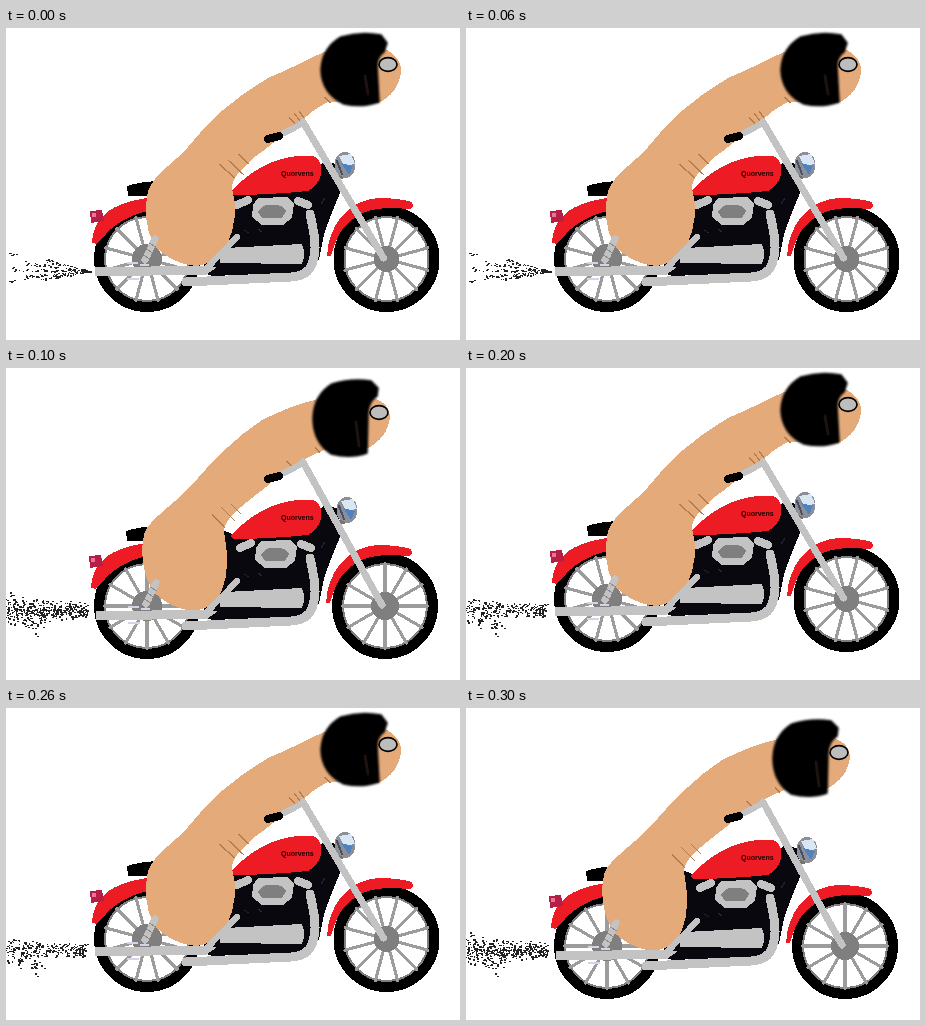
An HTML page for the animation above (0.4 s loop, 454 by 312 pixels).

```html
<!DOCTYPE html>
<html lang="en">
<head>
<meta charset="utf-8">
<title>Motorbike ride</title>
<style>
html, body { margin: 0; width: 100%; height: 100%; overflow: hidden; background: #fff; }
svg { display: block; width: 100%; height: 100%; }
text { font: bold 7px "Liberation Sans", sans-serif; }
</style>
</head>
<body>
<svg id="stage" viewBox="0 0 454 312" fill="none" shape-rendering="crispEdges"></svg>
<script>
const STEP = 100;
const SILVER = '#c3c3c3', GREY = '#7f7f7f', RED = '#ed1c24', SKIN = '#e5aa7a', BLACK = '#000';

const fill = (d, color) => `<path d="${d}" fill="${color}"/>`;
const line = (d, color, width, cap = 'round') =>
  `<path d="${d}" stroke="${color}" stroke-width="${width}" stroke-linecap="${cap}" stroke-linejoin="round"/>`;
const disc = (x, y, rx, ry, color, extra = '') =>
  `<ellipse cx="${x}" cy="${y}" rx="${rx}" ry="${ry}" fill="${color}" ${extra}/>`;
const shift = ([x, y], ...parts) => `<g transform="translate(${x} ${y})">${parts.join('')}</g>`;

function wheel([x, y], hub, turn) {
  let spokes = '';
  for (let i = 0; i < 12; i++) {
    const a = (i * 30 + turn) * Math.PI / 180;
    spokes += `M0 0L${(43 * Math.cos(a)).toFixed(1)} ${(43 * Math.sin(a)).toFixed(1)}`;
  }
  return shift([x, y],
    disc(0, 0, 48, 48, '#fff', `stroke="${BLACK}" stroke-width="10"`),
    disc(0, 0, 42, 42, 'none', `stroke="${GREY}" stroke-width="2"`),
    line(spokes, '#9c9c9c', 3.1),
    disc(0, 0, hub, hub, GREY));
}

const rearFender = () =>
  fill('M121 158Q132 154 152 153V168L122 168Z', BLACK) +
  fill('M86 215Q87 194 104 182Q122 171 152 169V181Q118 186 100 206L91 216Z', RED) +
  fill('M84 183L96 182L98 193L85 195Z', '#b51f45') + fill('M86 185h4v4h-4z', '#e8749a');

const frontFender = () =>
  fill('M321 228C322 198 342 172 372 170Q392 170 406 174Q409 181 402 181Q384 179 371 181C350 184 334 199 329 216L325 228Z', RED);

const engine = () =>
  fill('M213 156L230 164L300 160L317 134L331 136L336 160L325 187L318 206L313 232L300 244L207 248L194 244L216 207Z', '#08080e') +
  line('M238 202l5 3m9-4l4 3m45-16l5-4m9-8l4-6m-82 51l7 1m32 1l6-1', '#25253d', 1);

const engineTrim = () =>
  line('M231 177L242 172', SILVER, 8) + line('M292 173L302 177', SILVER, 8) +
  fill('M252 170L281 169L288 176L286 190L277 197H256L246 189L247 177Z', SILVER) +
  fill('M257 178Q266 175 275 178L280 183L276 190H256L252 184Z', GREY);

const lowerPipes = () =>
  fill('M219 220L296 216Q300 226 296 236L214 235Q213 228 219 220Z', SILVER) +
  line('M304 186C308 205 312 220 306 236Q302 248 285 249L180 254', SILVER, 9) +
  line('M231 209L201 240', SILVER, 6);

const tank = label =>
  fill('M224 164Q244 143 266 134Q288 126 307 128Q317 132 315 146Q313 157 302 163Q260 167 228 167Z', RED) +
  `<text x="275" y="148" fill="#200">${label}</text>`;

const lamp = () =>
  disc(339, 137, 10.5, 13, '#8c8e98') + fill('M333 128L345 126L349 136L338 138Z', '#d9e7f5') +
  fill('M335 135L347 138L343 147Z', '#4f83bd') + line('M331 133L336 146', '#4a5063', 2) +
  line('M328 147L336 150', '#77736b', 3);

const muffler = () =>
  line('M149 211L139 232', SILVER, 7) +
  line('M143 215l7 4m-10 2l7 4m-10 2l7 4', '#8c8c8c', 1) +
  fill('M89 239L200 238L211 239L200 247L89 248Z', SILVER) +
  line('M122 235h9m4 2h7m-20 14h10', '#dcd0e8', 2);

function rider(p) {
  return fill(p.body, SKIN) + line(p.folds, '#b47b4d', 1.3);
}

function head(p) {
  const [x, y] = p.goggles;
  return `<g shape-rendering="auto"><g filter="url(#soft)">${fill(p.helmet, BLACK)}${line(p.helmet, BLACK, 1.5)}</g>` +
    line(p.shine, '#1d1210', 3) +
    disc(x, y, 9, 6.8, '#bdbdbd', `stroke="${BLACK}" stroke-width="1.7"`) + '</g>';
}

function scene(p) {
  const [fx, fy] = p.front;
  return wheel(p.rear, 15, p.turn) + wheel(p.front, p.hub, p.turn) +
    shift(p.rearFender, rearFender()) + shift(p.frontFender, frontFender()) +
    shift(p.block, engine()) + shift(p.trim, engineTrim()) +
    shift(p.tank, tank('Quorvens')) + shift(p.lamp, lamp()) + rider(p) +
    shift(p.block, lowerPipes()) + shift(p.muffler, muffler()) +
    line(`M297 94L${fx - 3} ${fy - 1}`, SILVER, 7) +
    line('M297 95L288 100L278 105', SILVER, 6) + line('M262 111L273 108', BLACK, 8) + head(p);
}

const high = {
  rear: [141, 231], front: [380.5, 231], hub: 13, turn: 15,
  rearFender: [0, 0], frontFender: [0, 0], block: [0, 0], trim: [0, 0],
  tank: [0, 0], lamp: [0, 0], muffler: [0, 0],
  body: 'M142 163C150 144 166 137 182 119C203 92 228 70 262 50C284 41 300 32 318 24L378 20Q396 30 395 44Q392 66 372 75L322 74Q302 84 296 94C278 104 270 114 250 128C238 140 226 148 226 160C231 178 230 198 221 217Q210 236 190 238Q164 235 148 217C139 200 138 180 142 163Z',
  folds: 'M213 136L229 150M222 132L238 147M232 126L243 136M283 89L289 96M288 85L294 93M293 83L298 90M318 69L325 75',
  helmet: 'M315 42Q316 20 335 9Q355 3 375 7L381 15L378 24Q371 29 371 38L373 74Q356 80 338 76Q316 66 315 42Z',
  shine: 'M359 48L362 66', goggles: [382, 36.5]
};
const low = {
  rear: [141, 238], front: [379, 238], hub: 14, turn: 0,
  rearFender: [-1, 5], frontFender: [-1, 7], block: [0, 4], trim: [3, 3],
  tank: [0, 4], lamp: [2, 5], muffler: [1, 4],
  body: 'M138 166C143 152 162 141 184 119C207 92 230 69 256 52C276 42 292 36 312 31L368 30Q384 36 384 50Q381 70 362 80L318 82Q300 90 290 96C272 108 262 118 246 130C230 143 218 152 218 164C222 185 223 205 216 222Q207 242 185 243Q160 238 146 222C136 204 134 184 138 166Z',
  folds: 'M206 146L219 160M215 139L229 153M225 136L235 146M280 93L286 98M309 79L314 85',
  helmet: 'M307 50Q308 27 326 16Q345 10 365 13L372 20L371 28Q363 33 362 44L361 85Q345 91 325 86Q307 74 307 50Z',
  shine: 'M350 54L353 78', goggles: [373, 44.5]
};

function random(seed) {
  return () => (seed = (seed * 16807) % 2147483647) / 2147483647;
}

const speck = (x, y, w = 1, h = 1) => `M${Math.round(x)} ${Math.round(y)}h${w}v${h}h-${w}z`;

// Thin dotted rays meeting at the tailpipe.
function rays() {
  const rnd = random(41);
  let d = '';
  for (const [x, y] of [[39, 232], [19, 235], [13, 242], [17, 249], [34, 252]]) {
    for (let i = 0; i < 42; i++) {
      const k = rnd();
      d += speck(84 + (x - 84) * k, 243 + (y - 243) * k + (rnd() - .5) * 4 * k, 1 + (rnd() > .4), 1 + (rnd() > .8));
    }
  }
  for (let i = 0; i < 16; i++) d += speck(3 + rnd() * 7, [225, 239, 250][i % 3] + rnd() * 4, 2);
  return d;
}

// A drifting cloud, wider away from the tailpipe.
function cloud(seed, count, middle, spread) {
  const rnd = random(seed);
  let d = '';
  for (let i = 0; i < count; i++) {
    const x = rnd() * 81;
    const reach = spread * (1.15 - x / 130);
    const y = middle + (rnd() + rnd() - 1) * reach;
    d += speck(x, y, 1 + (rnd() > .4), 1 + (rnd() > .6));
  }
  for (let i = 0; i < 22; i++) d += speck(10 + rnd() * 28, 251 + rnd() * 9, 2, 1 + (rnd() > .6));
  return d + speck(29, 265, 2, 2) + speck(31, 268, 2);
}

const dense = cloud(77, 400, 242, 14) + speck(4, 224, 2, 2) + speck(5, 227, 2);
const smoke = [rays(), dense, cloud(19, 250, 242, 12), dense];

const stage = document.getElementById('stage');
stage.innerHTML = '<defs><filter id="soft"><feGaussianBlur stdDeviation="1"/></filter></defs>' +
  `<path id="smoke" fill="#222"/><g id="high">${scene(high)}</g><g id="low">${scene(low)}</g>`;
const part = id => document.getElementById(id);
const puff = part('smoke'), poses = [part('high'), part('low')];

function draw(time) {
  const step = Math.floor(time / STEP) % 4;
  puff.setAttribute('d', smoke[step]);
  poses.forEach((g, i) => g.setAttribute('display', i === step % 2 ? 'inline' : 'none'));
}

let start;
function tick(now) {
  start ??= now;
  draw(now - start);
  requestAnimationFrame(tick);
}
draw(0);
requestAnimationFrame(tick);
</script>
</body>
</html>
```
